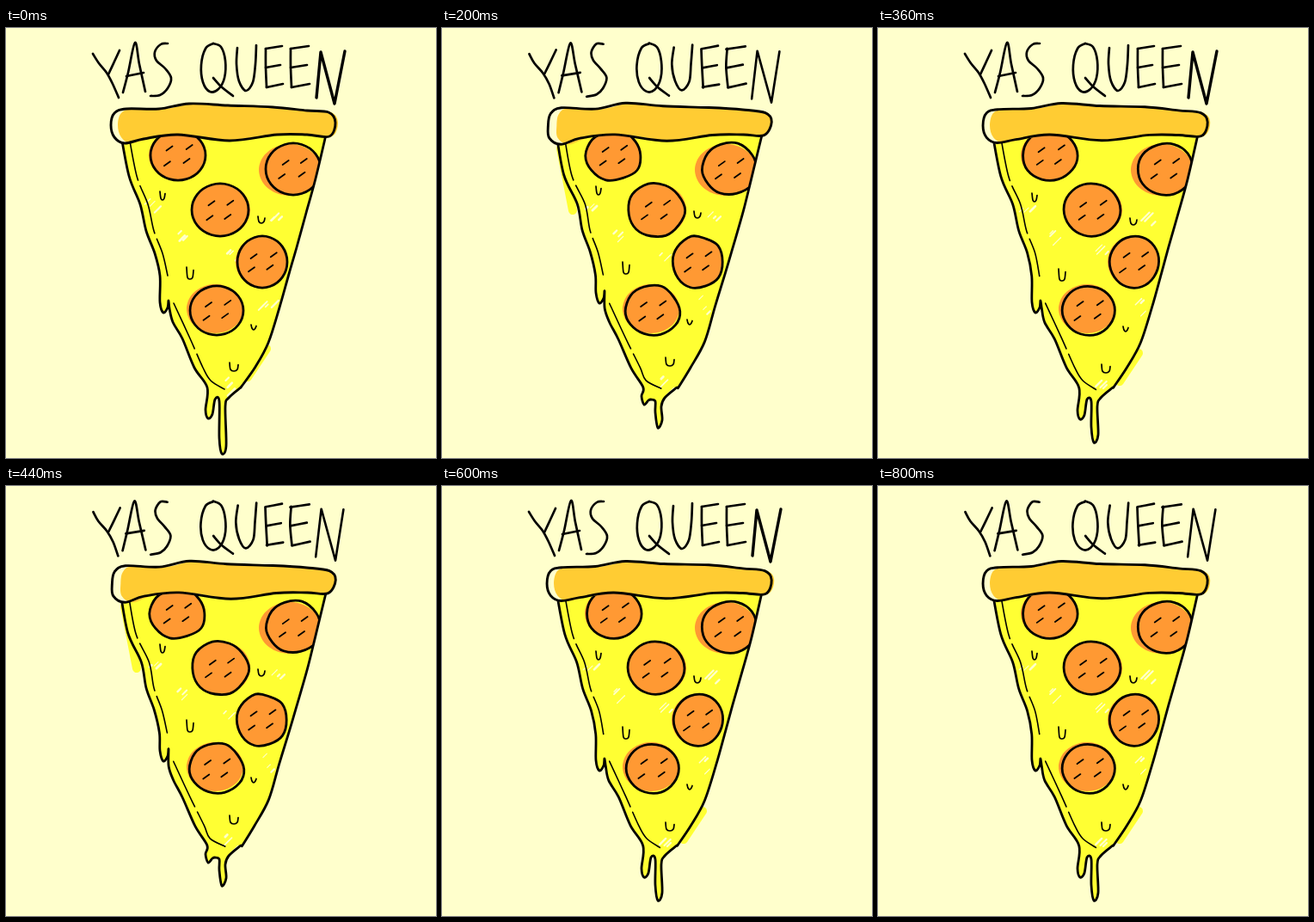
These frames come from a looping animation (500 px wide and 500 px high, 840 ms). An HTML page:

```html
<!DOCTYPE html>
<html lang="en">
<head>
<meta charset="utf-8">
<title>Yas queen pizza</title>
<style>
  html, body { margin: 0; width: 100%; height: 100%; overflow: hidden; background: #ffffcc; }
  svg { display: block; width: 100vw; height: 100vh; }
  path { fill: none; stroke-linecap: round; stroke-linejoin: round; }
</style>
</head>
<body>
<svg id="stage" viewBox="0 0 500 500" role="img" aria-label="YAS QUEEN"></svg>
<script>
const STEP = 40, STEPS = 21;
const PALE = '#ffffcc', CHEESE = '#ffff33', CRUST = '#ffcc33', MEAT = '#ff9933', INK = '#000';
const stage = document.getElementById('stage');

function add(parent, tag, attrs = {}) {
  const el = document.createElementNS('http://www.w3.org/2000/svg', tag);
  for (const k in attrs) el.setAttribute(k, attrs[k]);
  return parent.appendChild(el);
}
const pts = s => s.split(' ').map(p => p.split(',').map(Number));
const shift = (p, dx, dy) => p.map(([x, y]) => [x + dx, y + dy]);

// Seeded random numbers from -1 to 1
function seeded(seed) {
  let s = seed * 7919 + 17;
  return () => (s = s * 16807 % 2147483647) / 1073741823.5 - 1;
}
const wobble = (p, rnd, size) => p.map(([x, y]) => [x + rnd() * size, y + rnd() * size]);

// Smooth curve through points
function curve(p, closed, start = 'M') {
  const n = p.length;
  const at = i => closed ? p[(i + n) % n] : p[Math.max(0, Math.min(n - 1, i))];
  let d = start + p[0];
  for (let i = 0; i < (closed ? n : n - 1); i++) {
    const [a, b, c, e] = [at(i - 1), at(i), at(i + 1), at(i + 2)];
    d += `C${b[0] + (c[0] - a[0]) / 6},${b[1] + (c[1] - a[1]) / 6} ` +
         `${c[0] - (e[0] - b[0]) / 6},${c[1] - (e[1] - b[1]) / 6} ${c}`;
  }
  return d + (closed ? 'Z' : '');
}
const ink = (g, p, w, color = INK, closed = false) =>
  add(g, 'path', { d: curve(p, closed), stroke: color, 'stroke-width': w });
const fill = (g, d, color) => add(g, 'path', { d, style: 'fill:' + color });

function ring(cx, cy, rx, ry) {
  return Array.from({ length: 10 }, (_, i) => {
    const a = i * Math.PI / 5;
    return [cx + rx * Math.cos(a), cy + ry * Math.sin(a)];
  });
}

const crustLine = pts('122,113 126,99 140,94 178,94 213,88 258,90 310,92 350,96 375,98 383,110 ' +
  '376,126 350,124 315,124 260,131 200,124 160,129 138,134 126,127');
const leftTop = pts('133,120 143,172 156,205 163,236 173,262 179,288');
const leftLow = pts('190,326 194,342 205,361 219,395 234,418');
const rightEdge = pts('373,120 360,175 349,215 338,255 329,286 318,325 305,366 290,394 273,418');
const innerLow = pts('195,320 214,361 229,395 238,410 254,420');
// Centre, radii and the shift of the colour under the line
const toppings = [[200, 148, 32, 29, -1, 0], [334, 164, 32, 30, -4, 1], [249, 211.5, 33, 30.5, 1, 0],
  [298, 272, 29, 30, -1, 0], [245, 328.5, 31, 28.5, -2, -2]];
const drops = [[182, 195, 3, 5], [297, 223, 4, 4], [214, 285, 4, 7], [288, 348, 3, 3], [265, 394, 5, 5]];
const scuffs = pts('172,210 205,240 315,222 262,262 306,322 260,415');

// Drip ends, drop shift, crust colour inset at each end, and where colour leaves the line
const looks = [
  { tip: 495, small: 454, side: 331, drop: 0, inset: [8, 3], spill: '303,373 281,406' },
  { tip: 482, small: 455, side: 331, drop: 2, inset: [8, 3], spill: '303,378 281,411' },
  { tip: 465, small: 438, side: 320, drop: -6, inset: [10, 0], spill: '138,140 152,212' }
];

const sideDrip = y => [[179, y - 12], [183, y], [188, y - 6], [189, y - 14]];
const tipDrips = (small, tip) => [[232, small - 10], [235, small], [240, small - 5], [243, 432],
  [248, 434], [248, tip - 18], [251, tip], [256, tip - 9], [255, 440], [259, 430], [273, 418]];

function drawSlice(k) {
  const look = looks[k], rnd = seeded(k + 3), g = add(stage, 'g');
  const rough = p => wobble(p, rnd, k * 0.7);
  const upper = rough(leftTop);
  const left = [...upper, ...sideDrip(look.side), ...rough(leftLow), ...tipDrips(look.small, look.tip)];
  const right = rough(rightEdge);
  const body = curve(left) + curve([...right].reverse(), false, 'L') + 'Z';
  add(add(g, 'clipPath', { id: 'body' + k }), 'path', { d: body });

  ink(g, pts(look.spill), 10, CHEESE);
  fill(g, body, CHEESE);
  for (const [x, y] of scuffs) {
    for (let i = -1; i < 2; i++) {
      const cx = x + i * 5 + rnd() * 3, cy = y + i * 4 + rnd() * 6, len = 3 + rnd() * 2;
      ink(g, [[cx - len, cy + len], [cx + len, cy - len]], 2 + rnd(), PALE);
    }
  }

  const meat = add(g, 'g', { 'clip-path': `url(#body${k})` });
  for (const [x, y, rx, ry, dx, dy] of toppings) {
    fill(meat, curve(ring(x + dx, y + dy, rx + Math.abs(dx), ry), true), MEAT);
    ink(meat, rough(ring(x, y, rx, ry)), 2.8, INK, true).setAttribute('d', curve(rough(ring(x, y, rx, ry)), true));
    for (const [sx, sy] of [[-1, -1], [1, -1], [-1, 1], [1, 1]]) {
      const mx = x + sx * 11 - sy * 1.5 + rnd(), my = y + sy * 8 - sx + rnd();
      ink(meat, [[mx - 3.5, my + 2.5], [mx + 3.5, my - 2.5]], 1.8);
    }
  }

  for (const [x, cy, w, h] of drops) {
    const y = cy + look.drop;
    ink(g, [[x - w, y - h], [x - w + 1, y + h - 2], [x, y + h], [x + w - 1, y + h - 2], [x + w, y - h / 2]], 1.7);
  }
  for (const p of [shift(upper, 9, 0), rough(innerLow)]) {
    ink(g, p, 1.6).setAttribute('stroke-dasharray', '58 7');
  }
  ink(g, left, 2.8);
  ink(g, right, 2.8);

  const crust = rough(crustLine), [near, far] = look.inset;
  const tint = crust.map(([x, y]) => {
    const u = (x - 122) / 261;
    return [x + near * (1 - u) + far * u, y];
  });
  fill(g, curve(crust, true), PALE);
  fill(g, curve(tint, true), CRUST);
  ink(g, crust, 2.9, INK, true);
  return g;
}

const letterE = (x, w) => [[[x, 24], [x, 45], [x + 1, 69]], [[x, 24], [x + w, 21]],
  [[x, 46], [x + w - 2, 43]], [[x + 1, 69], [x + w + 1, 65]]];
const letters = [
  ...['101,30 108,41 117,52 124,65 131,81', '132,26 126,39 119,54',
    '136,75 142,52 150,17 155,42 162,74', '140,56 160,52',
    '188,18 180,19 173,28 175,38 185,47 192,58 188,70 179,78 168,79',
    '241,18 232,24 227,43 229,63 237,74 247,71 254,58 255,38 250,22 241,18', '241,58 250,68 264,79',
    '269,23 268,42 271,62 279,73 287,63 290,42 291,20'].map(pts),
  ...letterE(302, 19), ...letterE(331, 21)
];
const letterN = pts('361,81 366,28 382,88 394,27');

function drawTitle(k) {
  const g = add(stage, 'g'), rnd = seeded(k + 11);
  for (const p of letters) ink(g, wobble(p, rnd, k * 0.4), 2.7);
  add(g, 'path', { d: 'M' + wobble(letterN, rnd, k).join('L'), stroke: INK, 'stroke-width': k ? 2.6 : 3.4 });
  return g;
}

// Three drawings in turn, each held for a number of steps
function cycle(draw, hold) {
  for (let k = 0; k < 3; k++) {
    const frames = [];
    for (let i = 0; i <= STEPS; i++) {
      const on = Math.floor((i % STEPS) / hold) % 3 === k;
      frames.push({ offset: i / STEPS, opacity: on ? 1 : 0, easing: 'step-end' });
    }
    // The small lead keeps rounding from landing just before a step
    draw(k).animate(frames, { duration: STEP * STEPS, iterations: Infinity, delay: -2, fill: 'both' });
  }
}

cycle(drawSlice, 2);
cycle(drawTitle, 1);
</script>
</body>
</html>
```
